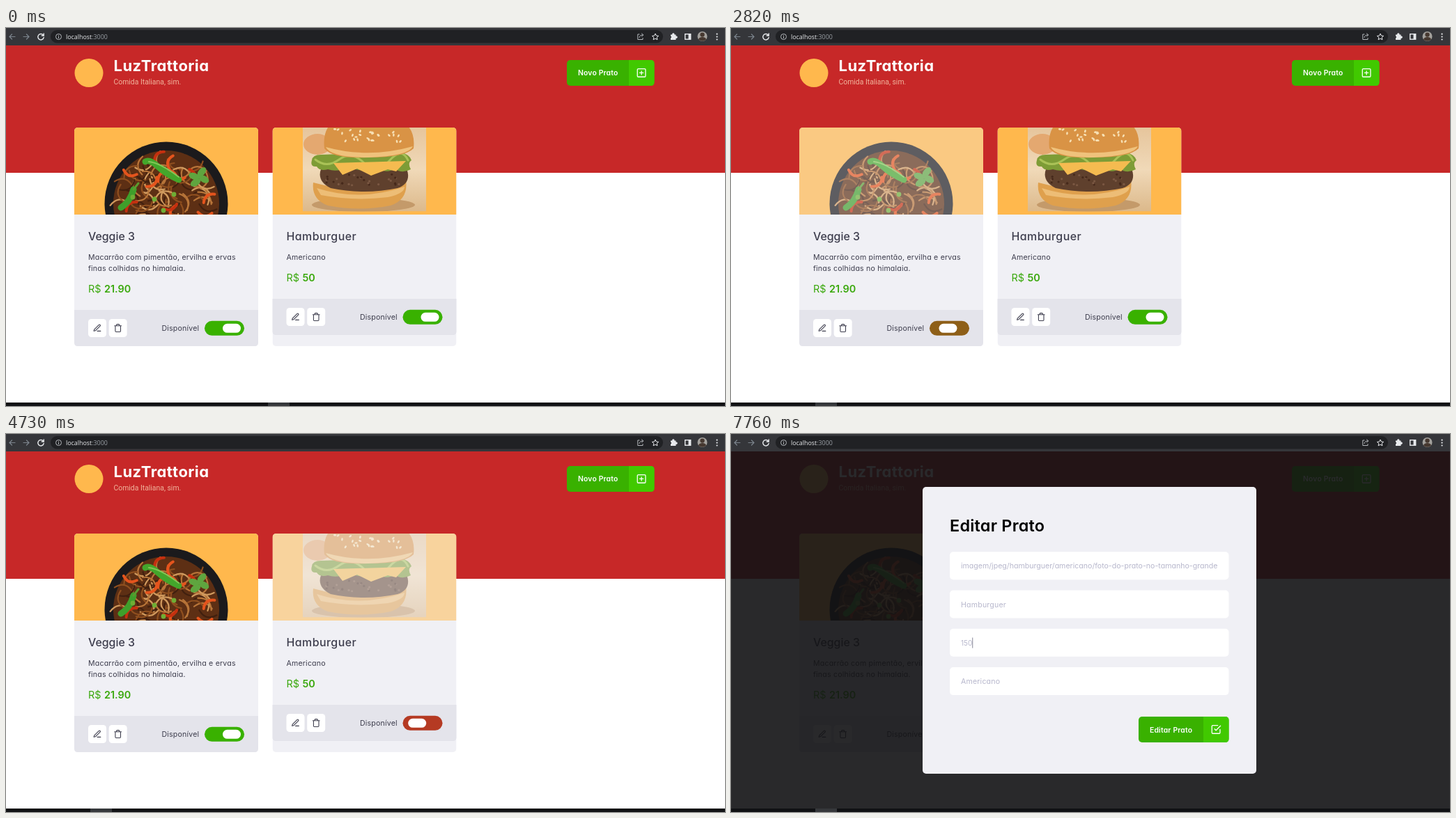
These frames come from a looping animation (1032 px wide and 543 px high, 8 s). An HTML page:

```html
<!DOCTYPE html>
<html lang="pt-BR">
<head>
<meta charset="utf-8">
<title>Cardápio</title>
<style>
  html, body { margin: 0; width: 100%; height: 100%; overflow: hidden; background: #fff; }
  svg { display: block; width: 100vw; height: 100vh; }
  text { font-family: Inter, sans-serif; font-feature-settings: "cv11"; white-space: pre; }
  .bar { font-family: "Open Sans", sans-serif; }
  .tag { font-family: Roboto, sans-serif; }
  .icon { fill: none; stroke-width: 2; stroke-linecap: round; stroke-linejoin: round; }
</style>
</head>
<body>
<svg id="stage" viewBox="0 0 1032 543" xmlns="http://www.w3.org/2000/svg"></svg>
<script>
const LOOP = 8000, STEP = 70;
const RED = [199, 40, 40], GREEN = [57, 177, 0];
const INK = '#3d3d4d', PALE = '#b7b7cc', CARD = '#f0f0f5';

const ICONS = {
  plus: '<rect x="3" y="3" width="18" height="18" rx="2"/><path d="M12 8v8M8 12h8"/>',
  check: '<path d="M9 11l3 3L22 4M21 12v7a2 2 0 0 1-2 2H5a2 2 0 0 1-2-2V5a2 2 0 0 1 2-2h11"/>',
  pen: '<path d="M12 20h9M16.5 3.5a2.1 2.1 0 0 1 3 3L7 19l-4 1 1-4z"/>',
  bin: '<path d="M3 6h18M19 6v14a2 2 0 0 1-2 2H7a2 2 0 0 1-2-2V6m3 0V4a2 2 0 0 1 2-2h4a2 2 0 0 1 2 2v2"/>'
};

// ---- markup helpers ----
const rect = (x, y, w, h, fill, rx = 0, more = '') =>
  `<rect x="${x}" y="${y}" width="${w}" height="${h}" rx="${rx}" fill="${fill}" ${more}/>`;
const disc = (x, y, r, fill) => `<circle cx="${x}" cy="${y}" r="${r}" fill="${fill}"/>`;
const line = (d, color, width) =>
  `<path d="${d}" fill="none" stroke="${color}" stroke-width="${width}" stroke-linecap="round"/>`;
const shape = (d, fill) => `<path d="${d}" fill="${fill}"/>`;
const text = (x, y, str, size, fill, weight = 400, gap = 0, more = '') =>
  `<text x="${x}" y="${y}" font-size="${size}" fill="${fill}" font-weight="${weight}" letter-spacing="${gap}em" ${more}>${str}</text>`;
const icon = (name, x, y, size, color) =>
  `<g class="icon" stroke="${color}" transform="translate(${x} ${y}) scale(${size / 24})">${ICONS[name]}</g>`;

function random(seed) {
  return () => (seed = (seed * 16807) % 2147483647) / 2147483647;
}

// ---- page parts ----
function browserBar() {
  const grey = '#7c858d', light = '#e8eaed', soft = '#b4b8bc';
  return rect(0, 0, 1032, 25, '#35363a') + rect(64, 3, 879, 18.5, '#202124', 9.2) +
    line('M13 12.5H5M8.5 9L5 12.5L8.5 16', grey, 1.2) +
    line('M25 12.5H33M29.5 9L33 12.5L29.5 16', grey, 1.2) +
    line('M53.4 10.2A4.2 4.2 0 1 0 54.2 13.4M54.2 8V11H51.2', light, 1.4) +
    `<circle cx="75.5" cy="12.5" r="4" fill="none" stroke="${soft}"/>` +
    line('M75.5 12V14.5M75.5 10.3V10.4', soft, 1) +
    text(86, 16, `localhost<tspan fill="#9aa0a6">:3000</tspan>`, 8.9, light, 400, 0, 'class="bar"') +
    line('M909 9H906.8V16.5H914V14.5M909 13.5C909.5 10.8 911.5 10 914.5 10M912.5 8L914.8 10L912.5 12', soft, 1) +
    `<path d="M932 8l1.4 3 3.2.4-2.4 2.2.7 3.2-2.9-1.6-2.9 1.6.7-3.2-2.4-2.2 3.2-.4z" fill="none" stroke="${light}"/>` +
    shape('M954 9.5H956.2A1.7 1.7 0 1 1 959.4 9.5H961.5V11.6A1.7 1.7 0 1 1 961.5 14.8V17H954V14.6A1.6 1.6 0 0 0 954 11.6Z', light) +
    `<rect x="974.7" y="8.7" width="8" height="7.5" fill="none" stroke="${light}" stroke-width="1.4"/>` +
    rect(979.5, 8.5, 3.4, 8, light) +
    disc(999.5, 12, 7, '#a3a19d') + disc(999.5, 9.6, 3.2, '#463830') +
    shape('M994 16.5Q994.5 13 999.5 13T1005 16.5Q999.5 21 994 16.5Z', '#463830') +
    [8.7, 12.6, 16.5].map(y => disc(1020.5, y, 1.1, light)).join('');
}

function button(x, y, w, split, label, mark, baseline) {
  return rect(x, y, w, 37, '#39b100', 5) +
    shape(`M${split} ${y}H${x + w - 5}q5 0 5 5v27q0 5 -5 5H${split}z`, '#41c900') +
    text(x + 16, baseline, label, 10.4, '#fff', 600, .015) +
    icon(mark, split + 10.3, y + 10.6, 15.6, '#fff');
}

function noodles() {
  const rnd = random(77), tones = ['#b87539', '#8f4f1f', '#d09a5e', '#41200f'];
  const strand = (color, width, size) => {
    const a = rnd() * 6.28, r = Math.sqrt(rnd()) * 68, dir = rnd() * 6.28;
    const x = 230 + r * Math.cos(a), y = 250 + r * Math.sin(a);
    const dx = size * Math.cos(dir), dy = size * Math.sin(dir);
    return line(`M${x - dx} ${y - dy}Q${x + dy} ${y - dx} ${x + dx} ${y + dy}`, color, width);
  };
  let out = disc(230, 252, 88.5, '#1b1a1c') + disc(230, 252, 76, '#5d2f14');
  for (let i = 0; i < 90; i++) out += strand(tones[i % 4], 2.2, 13);
  for (let i = 0; i < 16; i++) out += strand(i % 3 ? '#e4541d' : '#c5300f', 4, 10);
  out += line('M200 192Q206 188 218 199T248 218', '#44a62b', 9) +
    line('M205 192Q222 194 248 214', '#83c757', 2) +
    line('M165 258Q178 250 183 232', '#3f9f2b', 9) + line('M183 232L190 223', '#5b9a2f', 3);
  for (const [x, y, turn] of [[270, 213, 20], [281, 207, -50], [284, 217, 30], [272, 222, -30]])
    out += `<ellipse cx="${x}" cy="${y}" rx="8" ry="4.8" fill="#5fa53f" transform="rotate(${turn} ${x} ${y})"/>`;
  for (const [x, y] of [[182, 243], [226, 262], [241, 239], [213, 246]]) out += disc(x, y, 3.4, '#6fae35');
  return out;
}

function burger() {
  const rnd = random(11);
  let out = rect(426, 143, 177, 120.5, 'url(#table)') +
    `<ellipse cx="447" cy="167" rx="20" ry="15" fill="#e4a870"/>` +
    `<ellipse cx="513" cy="254" rx="74" ry="10" fill="#c49a6a"/>` +
    shape('M441 222Q512 242 574 218Q578 246 552 255Q508 264 462 255Q438 246 441 222Z', '#dfa04d') +
    shape('M446 230Q508 250 572 228Q572 238 548 243Q500 249 452 240Z', '#edbd76') +
    shape('M452 203Q512 188 574 200Q584 222 562 230Q514 240 466 230Q446 220 452 203Z', '#5f402d');
  for (let i = 0; i < 30; i++)
    out += disc(460 + rnd() * 104, 210 + rnd() * 18, 1.6, i % 2 ? '#46291b' : '#7b5843');
  out += shape('M439 190Q440 182 452 182L566 178Q580 182 582 190Q576 194 581 203Q568 210 558 202Q546 210 534 201Q510 209 492 199Q476 208 462 203Q450 206 446 199Q436 200 439 190Z', '#7e9c36') +
    line('M444 189Q460 202 478 189T514 194T550 191T577 190', '#aac257', 3) +
    shape('M470 194L574 191L560 206L548 203L524 212L504 202L483 211Z', '#f5bb50') +
    shape('M457 173Q453 138 482 128H558Q589 140 585 173Q572 186 520 186Q468 188 457 173Z', '#d99345') +
    shape('M459 171Q520 188 584 170Q578 184 520 186Q466 186 459 171Z', '#efc27c');
  for (let i = 0; i < 26; i++) {
    const x = 472 + rnd() * 96, y = 145 + rnd() * 18;
    out += `<ellipse cx="${x}" cy="${y}" rx="2.2" ry="1.3" fill="#f7e0b4" transform="rotate(${rnd() * 180} ${x} ${y})"/>`;
  }
  return `<g clip-path="url(#photo)">${out}</g>`;
}

function card(id, x, photo, title, gap, lines, price, priceX, foot) {
  const left = x + 20;
  return `<g clip-path="url(#clip${id})">` + rect(x, 143, 264, 314, CARD) +
    `<g id="photo${id}">` + rect(x, 143, 264, 125, '#ffb84d') +
    `<g clip-path="url(#top)">${photo}</g></g></g>` +
    text(left, 304.5, title, 15.9, INK, 500, gap) +
    lines.map((s, i) => text(left, 332.5 + 16.3 * i, s, 10.6, INK, 400, .018)).join('') +
    text(left, foot - 25.5, 'R$', 14.4, '#39a80c') +
    text(priceX, foot - 25.5, price, 14.4, '#39a80c', 600) +
    shape(`M${x} ${foot}h264v47q0 5 -5 5h-254q-5 0 -5 -5z`, '#e4e4eb') +
    rect(left, foot + 13, 26, 26, '#fff', 4.5) + rect(left + 29.7, foot + 13, 26, 26, '#fff', 4.5) +
    icon('pen', left + 6.5, foot + 19.5, 13, INK) + icon('bin', left + 36.2, foot + 19.5, 13, INK) +
    text(x + 179.3, foot + 30, '', 10.6, INK, 400, .018, `text-anchor="end" id="label${id}"`) +
    rect(x + 187, foot + 15.8, 57, 21, 'none', 10.5, `id="track${id}"`) +
    rect(x + 192, foot + 19.8, 26, 13, '#fff', 6.5, `id="knob${id}"`);
}

function modal() {
  const values = ['imagem/jpeg/hamburguer/americano/foto-do-prato-no-tamanho-grande', 'Hamburguer', '50', 'Americano'];
  return `<g id="modal">` + rect(0, 25, 1032, 513, 'rgb(18,18,20)', 0, 'opacity=".9"') +
    rect(275, 76, 479, 412, CARD, 5) +
    text(314, 140, 'Editar Prato', 23.4, '#000', 600, .01) +
    values.map((v, i) => {
      const y = 169.2 + 55.3 * i, price = i === 2;
      return rect(314, y, 400.5, 40, '#fff', 5) +
        (price ? rect(330, 292, 13.5, 16, '#3390ff', 0, 'id="mark"') : '') +
        text(330, y + 24, v, price ? 10 : 10.6, PALE, 400, i % 2 ? .018 : 0, price ? 'id="price"' : '');
    }).join('') +
    rect(330, 292.5, .9, 15, '#77778a', 0, 'id="caret"') +
    button(585, 406, 129.5, 678, 'Editar Prato', 'check', 428.6) + `</g>`;
}

const stage = document.getElementById('stage');
stage.innerHTML = `<defs>
  <linearGradient id="table" x2="0" y2="1"><stop offset="0" stop-color="#e6c59c"/>
    <stop offset=".5" stop-color="#f0d9b8"/><stop offset="1" stop-color="#dcb98b"/></linearGradient>
  <clipPath id="photo"><rect x="426" y="143" width="177" height="120.5"/></clipPath>
  <clipPath id="top"><rect x="98" y="143" width="549" height="125"/></clipPath>
  <clipPath id="clip0"><rect x="98" y="143" width="264" height="314" rx="5"/></clipPath>
  <clipPath id="clip1"><rect x="382.5" y="143" width="264" height="314" rx="5"/></clipPath>
  </defs>` +
  rect(0, 0, 1032, 543, '#fff') + rect(0, 25, 1032, 183, '#c72828') + browserBar() +
  disc(119, 64.5, 20.5, '#ffb84d') +
  text(154.5, 62, 'LuzTrattoria', 22, '#fff', 700, .02) +
  text(154.5, 80.5, 'Comida Italiana, sim.', 10.4, '#f0b49c', 400, 0, 'class="tag"') +
  button(805, 46, 125.5, 894, 'Novo Prato', 'plus', 68.4) +
  card(0, 98, noodles(), 'Veggie 3', 0,
    ['Macarrão com pimentão, ervilha e ervas', 'finas colhidas no himalaia.'], '21.90', 141, 405) +
  card(1, 382.5, burger(), 'Hamburguer', .03, ['Americano'], '50', 425.5, 389) +
  rect(0, 538, 1032, 5, '#101114') + rect(0, 538, 31, 5, '#36383b', 0, 'id="task"') +
  text(1003, 547.5, '17:50', 7.5, '#fff', 400, 0, 'class="bar"') + modal();

// ---- motion ----
const $ = id => document.getElementById(id);
const mix = (a, b, p) => a + (b - a) * p;

// Each click: first repaint, moment of the state change, card, new state.
const CLICKS = [
  [1260, 1290, 0, false],
  [2750, 2725, 0, true],
  [3830, 3907, 1, false],
  [4590, 4667, 1, true]
];
const SWITCH_LAG = 33;
// Price field: time, value, selected, caret shown.
const TYPING = [
  [0, '50', false, false],
  [6560, '50', false, true],
  [6630, '50', true, false],
  [7430, '1', false, true],
  [7630, '15', false, true],
  [7760, '150', false, true]
];

// cubic-bezier(.25, .1, .25, 1)
function ease(x) {
  if (x <= 0) return 0;
  if (x >= 1) return 1;
  const bez = (a, b, u) => 3 * a * u * (1 - u) ** 2 + 3 * b * u * u * (1 - u) + u ** 3;
  let lo = 0, hi = 1;
  for (let i = 0; i < 24; i++) {
    const mid = (lo + hi) / 2;
    if (bez(.25, .25, mid) < x) lo = mid; else hi = mid;
  }
  return bez(.1, 1, lo);
}

function snap(t) {
  const click = CLICKS.filter(c => c[0] <= t).pop();
  return click ? click[0] + Math.floor((t - click[0]) / STEP) * STEP : 0;
}

function drawCard(id, x, t) {
  const click = CLICKS.filter(c => c[2] === id && c[1] <= t).pop();
  const on = click ? click[3] : true, age = click ? t - click[1] : LOOP;
  const toward = p => on ? p : 1 - p;
  const slide = toward(ease((age - SWITCH_LAG) / 250));
  $('photo' + id).setAttribute('opacity', mix(.3, 1, toward(ease(age / 300))));
  $('label' + id).textContent = on ? 'Disponível' : 'Indisponível';
  $('track' + id).setAttribute('fill', `rgb(${RED.map((c, i) => Math.round(mix(c, GREEN[i], slide)))})`);
  $('knob' + id).setAttribute('x', x + 192 + 21 * slide);
}

function draw(t) {
  const s = snap(t);
  drawCard(0, 98, s);
  drawCard(1, 382.5, s);
  $('task').setAttribute('x', t < 1260 ? 376 : 121);
  $('modal').style.display = t < 5420 ? 'none' : '';
  const [, value, selected, caret] = TYPING.filter(k => k[0] <= t).pop();
  const price = $('price');
  price.textContent = value;
  price.setAttribute('fill', selected ? '#fff' : PALE);
  $('mark').style.display = selected ? '' : 'none';
  $('caret').style.display = caret ? '' : 'none';
  if (caret) $('caret').setAttribute('x', 330 + price.getComputedTextLength());
}

const begin = performance.now();
function tick() {
  draw((performance.now() - begin) % LOOP);
  requestAnimationFrame(tick);
}
tick();
</script>
</body>
</html>
```
